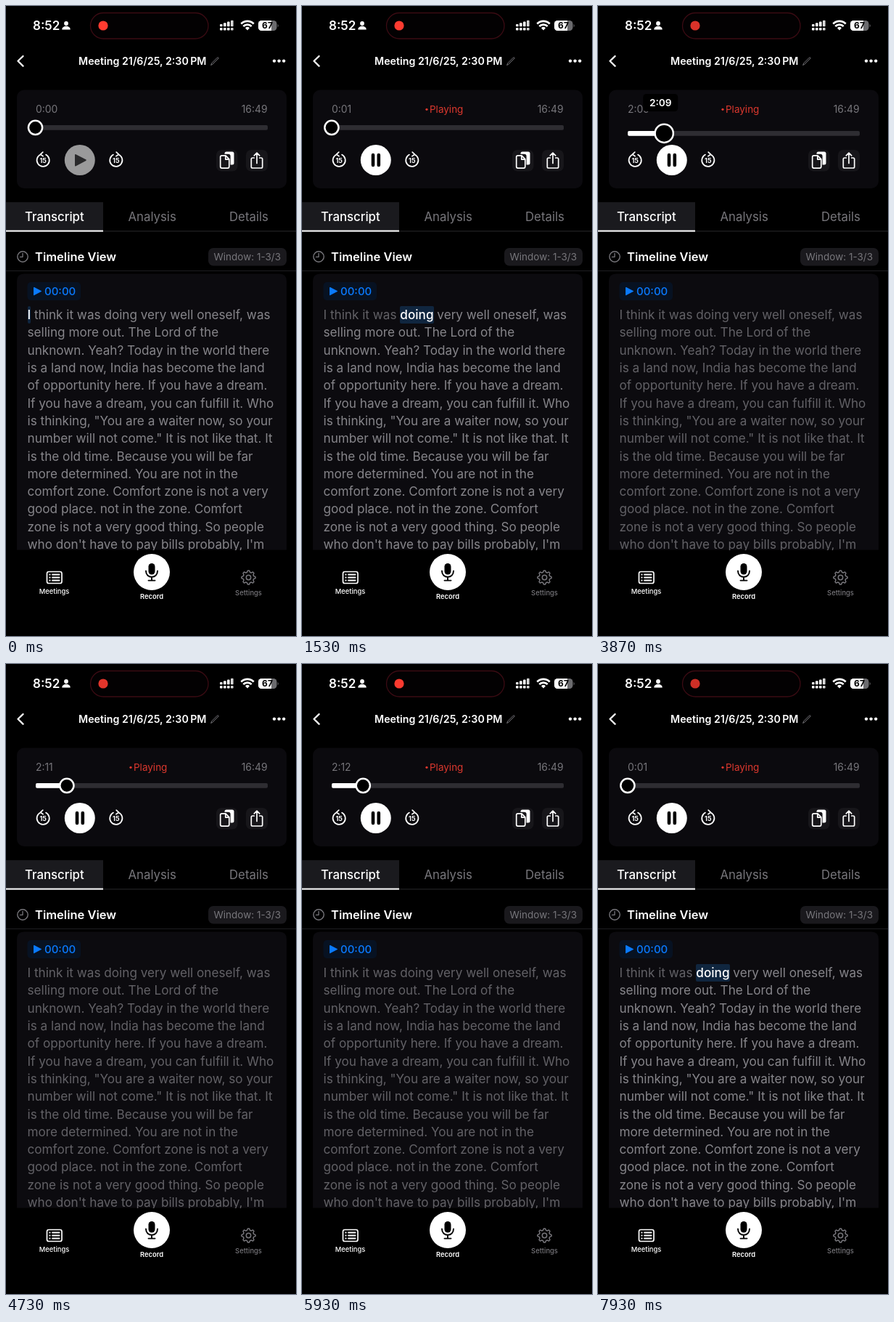
These frames come from a looping animation (400 by 867 pixels, 8000 ms). An HTML page:

```html
<!DOCTYPE html>
<html lang="en">
<head>
<meta charset="utf-8">
<title>Meeting player</title>
<style>
  html, body { margin: 0; width: 100%; height: 100%; overflow: hidden; background: #000; }
  body { position: relative; font-family: Inter, "Open Sans", sans-serif; }
  svg { position: absolute; left: 0; top: 0; width: 400px; height: 867px; }
  text { fill: #fff; font-family: Inter, "Open Sans", sans-serif; }
  .semi { font-weight: 600; }
  .medium { font-weight: 500; }
  .small { font-size: 13.9px; }
  .tab { font-size: 16.8px; }
  .nav { font-size: 9.4px; font-weight: 500; text-anchor: middle; }
  .end { text-anchor: end; }
  .muted { fill: #77767b; }
  .line { fill: none; stroke: #fff; stroke-width: 1.7; stroke-linecap: round; stroke-linejoin: round; }
  .faint { stroke: #77767b; }
  #transcript {
    position: absolute; left: 29.5px; top: 413px; width: 358px; height: 335.5px; overflow: hidden;
    font-size: 17.15px; line-height: 24.32px; white-space: pre; color: #86858a;
  }
  #transcript span { display: inline-block; height: 24.32px; border-radius: 2px; }
  #transcript .read { color: #626166; }
  #transcript .current { color: #fff; background: #10263f; font-weight: 500; }
  #shade { position: absolute; inset: 0; background: #000; opacity: 0; }
</style>
</head>
<body>
<svg viewBox="0 0 400 867">
  <rect width="400" height="867"/>

  <!-- status bar -->
  <text class="semi" x="37" y="33" font-size="17">8:52</text>
  <g fill="#fff">
    <circle cx="83" cy="24" r="2.9"/>
    <path d="M77.3 32.5c0-6.2 11.4-6.2 11.4 0z"/>
  </g>
  <rect x="116.5" y="9.5" width="162.5" height="35.5" rx="17.7" fill="#030102" stroke="#3b0b13" stroke-width="1.3"/>
  <circle id="recDot" cx="134" cy="27" r="6.6" fill="#ff3b30"/>
  <g id="signal" fill="#fff"></g>
  <g class="line" style="stroke-width:2.7;stroke-linecap:butt">
    <path d="M324.3 24.5a12.4 12.4 0 0 1 17.4 0"/>
    <path d="M327.3 28a8 8 0 0 1 11.4 0"/>
  </g>
  <path d="M333 33.5l-3-3.2a4.3 4.3 0 0 1 6 0z" fill="#fff"/>
  <rect x="348" y="20" width="25.5" height="14" rx="4.5" fill="#6b6b6e"/>
  <path d="M352.5 20H366v14h-13.5a4.5 4.5 0 0 1-4.5-4.5v-5a4.5 4.5 0 0 1 4.5-4.5z" fill="#fff"/>
  <path d="M374.7 24.7q2.2 2.3 0 4.6z" fill="#6b6b6e"/>
  <text x="360.5" y="31.3" font-size="12" font-weight="700" text-anchor="middle" style="fill:#000">67</text>

  <!-- title bar -->
  <path class="line" style="stroke-width:2.3" d="M23.5 69l-7 6.8 7 6.8"/>
  <text class="semi" x="100" y="81" font-size="14.25">Meeting 21/6/25, 2:30&#8201;PM</text>
  <path class="line faint" style="stroke-width:1" d="M282.8 81l.9-2.2 8.3-8.3 1.3 1.3-8.3 8.3z"/>
  <g fill="#fff"><circle cx="370" cy="75.6" r="2.2"/><circle cx="376.6" cy="75.6" r="2.2"/><circle cx="383.2" cy="75.6" r="2.2"/></g>

  <!-- player card -->
  <rect x="15" y="115.5" width="372" height="135.5" rx="10" fill="#0b0a0e"/>
  <text id="elapsed" class="small muted" x="41" y="147">0:00</text>
  <text class="small muted end" x="360.5" y="147">16:49</text>
  <g id="playing" fill="#dc382e">
    <circle cx="172" cy="142.3" r="1.6"/>
    <text x="176" y="147" font-size="13.5" style="fill:inherit">Playing</text>
  </g>
  <g class="line">
    <path d="M48 204.3a8.6 8.6 0 1 0 7 .3M50.8 201.1l-3.3 3 3.6 2.6"/>
    <path d="M155 204.3a8.6 8.6 0 1 1-7 .3M152.2 201.1l3.3 3-3.6 2.6"/>
  </g>
  <g font-size="9" font-weight="700" text-anchor="middle">
    <text x="51.2" y="215.7">15</text><text x="151.8" y="215.7">15</text>
  </g>
  <circle id="button" cx="101.8" cy="212" r="21"/>
  <path id="playIcon" d="M95 205v14.4q0 1.6 1.5.8l13.7-7.2q1.4-.9 0-1.7l-13.7-7.1q-1.5-.8-1.5.8z" fill="#29292b"/>
  <path id="pauseIcon" class="line" style="stroke:#000;stroke-width:4.6" d="M98 205v14M105.8 205v14"/>
  <rect x="290" y="198" width="29.5" height="29.5" rx="7" fill="#17161a"/>
  <rect x="301.5" y="200.5" width="13" height="18" rx="2.5" fill="#fff"/>
  <rect x="295" y="203.8" width="14.6" height="20.4" rx="3" fill="#17161a"/>
  <path class="line" d="M297.7 205.8h5.3l4.8 5v10.3q0 2-2 2h-8.1q-2 0-2-2v-13.3q0-2 2-2zM302.8 206.2v4.9h4.8"/>
  <rect x="331" y="198" width="30" height="29.5" rx="7" fill="#17161a"/>
  <path class="line" d="M342.3 209h-2.2q-1.8 0-1.8 1.8v10.4q0 1.8 1.8 1.8h11.8q1.8 0 1.8-1.8v-10.4q0-1.8-1.8-1.8h-2.2M346 216.5V202.5M342.3 205.9l3.7-3.7 3.7 3.7"/>
  <g id="slider">
    <rect x="41" y="164" width="320" height="6.8" rx="2" fill="#2e2d32"/>
    <rect id="fill" x="41" y="164" height="6.8" rx="2" fill="#fff"/>
    <circle id="thumb" cy="167.3" stroke="#fff" stroke-width="2.5"/>
  </g>
  <g id="tip">
    <rect x="-24" y="121" width="48" height="24" rx="4.5"/>
    <text id="tipText" class="semi" y="138" font-size="13.7" text-anchor="middle"></text>
  </g>

  <!-- tabs -->
  <rect y="270" width="134" height="40" fill="#1a1a1e"/>
  <rect y="309.4" width="400" height="1" fill="#29292c"/>
  <rect y="308.6" width="134" height="2" fill="#fff"/>
  <text class="tab medium" x="26" y="296.3">Transcript</text>
  <text class="tab muted" x="168.5" y="296.3">Analysis</text>
  <text class="tab muted" x="308" y="296.3">Details</text>

  <!-- timeline header -->
  <circle class="line faint" style="stroke-width:1.4" cx="23" cy="345" r="7.2"/>
  <path class="line faint" style="stroke-width:1.3" d="M23 340.3v5h-3.7"/>
  <text class="semi" x="40" y="351" font-size="16.5">Timeline View</text>
  <rect x="279" y="333" width="108" height="24.5" rx="7" fill="#1a191d"/>
  <text class="muted" x="286.5" y="350" font-size="13.5">Window: 1-3/3</text>
  <rect y="364" width="400" height="1" fill="#1e1e21"/>

  <!-- transcript panel -->
  <path d="M15 748.5V378.5q0-10 10-10h352q10 0 10 10v370z" fill="#0c0b0f"/>
  <rect x="29.5" y="380" width="73.5" height="25" rx="5" fill="#071222"/>
  <path d="M38 387.6v10q0 1 1 .5l9.6-5q.9-.5 0-1l-9.6-5q-1-.5-1 .5z" fill="#0a7aff"/>
  <text class="medium" x="53" y="398" font-size="15" style="fill:#0a7aff">00:00</text>

  <!-- bottom navigation -->
  <rect class="line" x="56.5" y="778.5" width="20.5" height="16" rx="2.5"/>
  <path class="line" style="stroke-width:2" d="M60.3 782.6h.3M60.3 786.5h.3M60.3 790.4h.3M64 782.6h9.5M64 786.5h9.5M64 790.4h9.5"/>
  <text class="nav" x="66.5" y="809.3">Meetings</text>
  <circle cx="201" cy="779" r="25" fill="#fff"/>
  <rect x="196.5" y="767" width="9" height="15.5" rx="4.5"/>
  <path class="line" style="stroke:#000;stroke-width:1.9" d="M193 777.5c0 11 16 11 16 0M201 786v4.5M196.5 790.6h9"/>
  <text class="nav" style="font-weight:600" x="201" y="815.6">Record</text>
  <path id="gear" class="line faint" style="stroke-width:1.5"/>
  <circle class="line faint" style="stroke-width:1.5" cx="334.5" cy="786.5" r="3.2"/>
  <text class="nav muted" x="334.5" y="810.6">Settings</text>
</svg>
<div id="transcript"></div>
<div id="shade"></div>

<script>
const LOOP = 8000;
const LINES = [
  'I think it was doing very well oneself, was',
  'selling more out. The Lord of the',
  'unknown. Yeah? Today in the world there',
  'is a land now, India has become the land',
  'of opportunity here. If you have a dream.',
  'If you have a dream, you can fulfill it. Who',
  'is thinking, "You are a waiter now, so your',
  'number will not come." It is not like that. It',
  'is the old time. Because you will be far',
  'more determined. You are not in the',
  'comfort zone. Comfort zone is not a very',
  'good place. not in the zone. Comfort',
  'zone is not a very good thing. So people',
  "who don't have to pay bills probably, I'm",
];
const OPENING = [0, 0.3, 0.6, 0.8, 1.05, 1.55, 1.95, 2.5];
const PRESS_END = 150, PLAY_AT = 350, PULSE = 1450;
const DRAG = { start: 3250, settle: 4050, release: 4200, to: 130.9 };
const REWIND = { start: 6360, length: 400 };

const $ = id => document.getElementById(id);
const clamp = x => Math.min(1, Math.max(0, x));
const ramp = (t, from, to) => clamp((t - from) / (to - from));
const smooth = p => p * p * (3 - 2 * p);
const show = (id, on) => $(id).setAttribute('visibility', on ? 'visible' : 'hidden');
const set = (id, attrs) => { for (const k in attrs) $(id).setAttribute(k, attrs[k]); };
const clock = s => `${Math.floor(s / 60)}:${String(Math.floor(s % 60)).padStart(2, '0')}`;

const words = [];
LINES.forEach(line => {
  line.split(' ').forEach((word, i) => {
    if (i) $('transcript').append(' ');
    const span = document.createElement('span');
    span.textContent = word;
    $('transcript').append(span);
    words.push(span);
  });
  $('transcript').append('\n');
});
const wordStart = i => OPENING[i] ?? 2.5 + (i - 7) * 0.4;

function drawSignal() {
  let marks = '';
  for (let i = 0; i < 4; i++) {
    const height = 3.4 + i * 1.7, opacity = i < 3 ? 1 : 0.85;
    marks += `<rect x="${295 + i * 5}" y="${28.3 - height}" width="3.6" height="${height}" rx="1" opacity="${opacity}"/>` +
      `<rect x="${295 + i * 5}" y="30" width="3.6" height="3.4" rx="1" opacity="${opacity}"/>`;
  }
  $('signal').innerHTML = marks;
}

function drawGear() {
  const points = [];
  for (let i = 0; i < 32; i++) {
    const angle = (i - 0.5) * Math.PI / 16, r = i % 4 < 2 ? 9.6 : 7.4;
    points.push(`${(334.5 + r * Math.sin(angle)).toFixed(2)} ${(786.5 - r * Math.cos(angle)).toFixed(2)}`);
  }
  set('gear', { d: `M${points.join('L')}Z` });
}

// Playback position in seconds
function position(t) {
  const play = Math.max(0, t - PLAY_AT) / 1000;
  if (t < DRAG.start) return play;
  if (t < DRAG.release) {
    const from = (DRAG.start - PLAY_AT) / 1000;
    const p = 1 - (1 - ramp(t, DRAG.start, DRAG.settle)) ** 3;
    return from + (DRAG.to - from) * p;
  }
  if (t < REWIND.start) return DRAG.to + (t - DRAG.release) / 1000;
  const end = REWIND.start + REWIND.length;
  if (t >= end) return (t - end) / 1000;
  const top = DRAG.to + (REWIND.start - DRAG.release) / 1000;
  return top * (1 - smooth(ramp(t, REWIND.start, end)));
}

function render(t) {
  const seconds = position(t);
  const playing = t >= PRESS_END;
  const grow = smooth(ramp(t, DRAG.start, DRAG.start + 150) * (1 - ramp(t, DRAG.release, DRAG.release + 150)));
  const x = 40.5 + seconds * 0.33;

  $('elapsed').textContent = $('tipText').textContent = clock(seconds);
  show('playing', playing);
  show('pauseIcon', playing);
  show('playIcon', !playing);
  set('button', { fill: playing ? '#fff' : '#9a9a9b' });

  set('slider', { transform: `translate(0 ${8 * grow})` });
  set('fill', { width: Math.max(0, x - 41) });
  set('thumb', { cx: x + 8 * grow, r: 9.6 + 3 * grow });
  set('tip', { transform: `translate(${x + 3} 0)`, opacity: grow });

  words.forEach((span, i) => {
    span.className = seconds >= wordStart(i + 1) ? 'read' : seconds >= wordStart(i) ? 'current' : '';
  });

  set('recDot', { opacity: 0.9 + 0.1 * Math.cos(t / PULSE * 2 * Math.PI) });
  $('shade').style.opacity = t < 875 ? ramp(t, 200, 850) : 1 - ramp(t, 900, 1500);
}

drawSignal();
drawGear();
const begin = performance.now();
function tick() {
  render((performance.now() - begin) % LOOP);
  requestAnimationFrame(tick);
}
tick();
</script>
</body>
</html>
```
